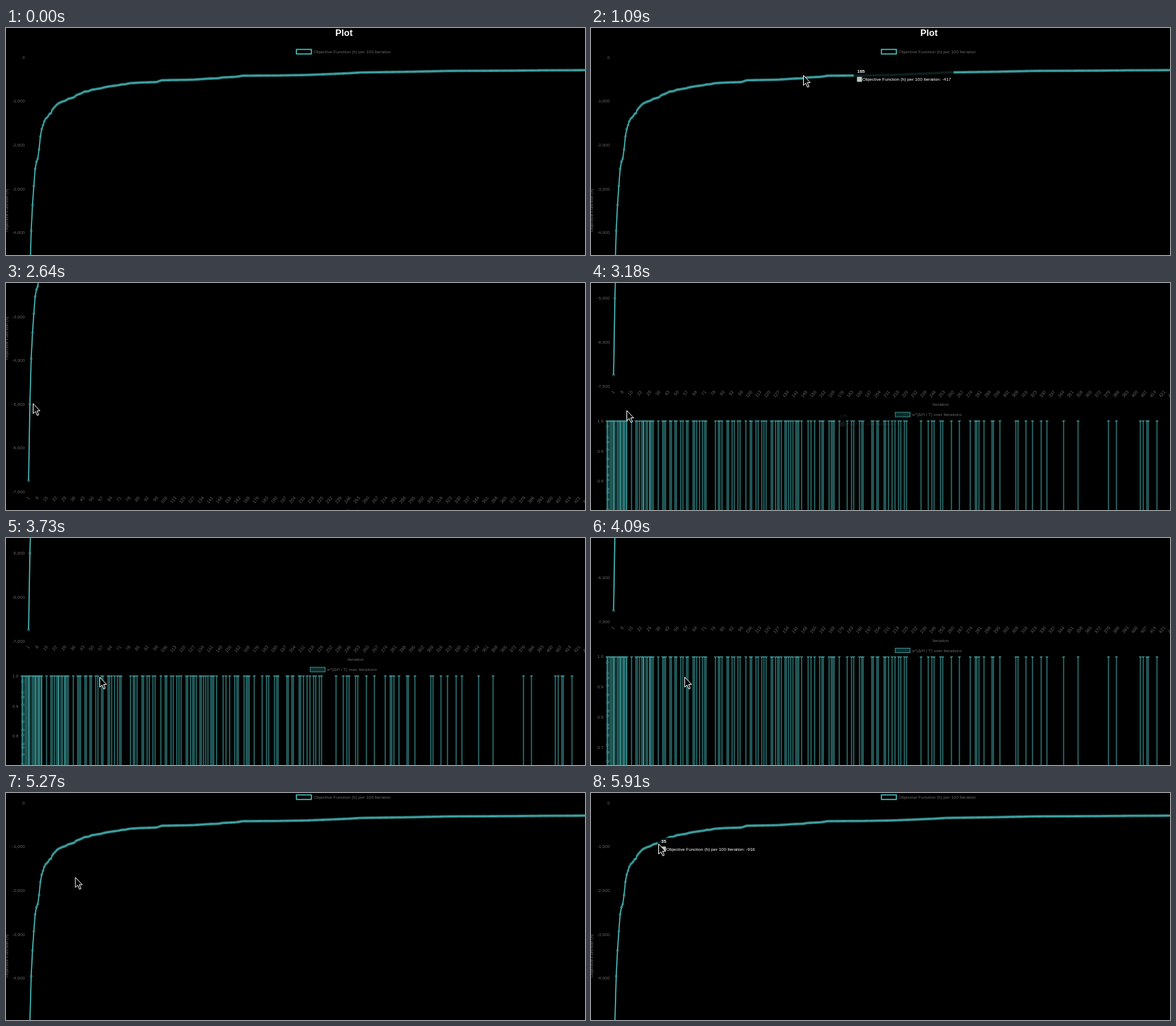
These frames come from a looping animation (800 by 314 pixels, 6 s). An HTML page:

```html
<!DOCTYPE html>
<html lang="en">
<head>
<meta charset="utf-8">
<title>Plot</title>
<style>
  html, body { margin: 0; width: 100%; height: 100%; overflow: hidden; background: #000; }
  svg { display: block; width: 100%; height: 100%; }
  text { font: 6.17px "Liberation Sans", Arial, sans-serif; fill: #666; }
  .title { font-size: 12.6px; font-weight: bold; fill: #fff; }
  .tip text { fill: #fff; }
  .tip .head { font-weight: bold; }
  .mid { text-anchor: middle; }
  .end { text-anchor: end; }
  .line { fill: none; stroke: #4bc0c0; stroke-width: 1.54; stroke-linejoin: round; }
  .dots { fill: rgba(0, 0, 0, .1); stroke: #45b0b0; stroke-width: .6; }
  .bars { fill: none; stroke: #3da3a2; stroke-width: 1.05; }
  .caps { fill: #2f7b7a; stroke: #459f9d; stroke-width: .5; }
</style>
</head>
<body>
<svg viewBox="0 0 800 314">
  <g id="page"></g>
  <g id="tip" class="tip">
    <rect y="-10.8" height="21.6" rx="3" fill="#000" fill-opacity=".8"/>
    <text class="head" x="5" y="-3.8"></text>
    <rect x="4.9" y="1.9" width="6.2" height="6.2" fill="#b4c8c5" stroke="#dfe8e6" stroke-width=".5"/>
    <text x="12" y="7.2"></text>
  </g>
  <path id="cursor" d="M.5 .5V14.3L3.7 11.4 6.1 16.9 8.2 16 5.9 10.6H10Z"
    fill="#000" stroke="#fff" stroke-width=".95" stroke-linejoin="round"/>
</svg>
<script>
const $ = id => document.getElementById(id);
const page = $('page'), tip = $('tip'), cursor = $('cursor');

function add(tag, attrs, content) {
  const el = document.createElementNS('http://www.w3.org/2000/svg', tag);
  for (const name in attrs) el.setAttribute(name, attrs[name]);
  if (content) el.textContent = content;
  page.append(el);
}
// y is the middle of the capitals
const label = (x, y, str, cls = '', turn = 0) =>
  add('text', { class: cls, y: 2.2, transform: `translate(${x} ${y}) rotate(${turn})` }, str);

// Values of the keys [step, a, b, ...] at step k, linear between keys
function track(keys, k) {
  const n = keys.findIndex(key => key[0] > k);
  if (n === 0) return keys[0].slice(1);
  if (n < 0) return keys[keys.length - 1].slice(1);
  const a = keys[n - 1], b = keys[n], f = (k - a[0]) / (b[0] - a[0]);
  return a.slice(1).map((v, i) => v + (b[i + 1] - v) * f);
}
const circle = (x, y, r) =>
  `M${(x + r).toFixed(2)} ${y.toFixed(2)}a${r} ${r} 0 1 1 ${-2 * r} 0a${r} ${r} 0 1 1 ${2 * r} 0z`;

const tickX = i => 31.2 + i * 1.812;
const series = 'Objective Function (h) per 100 Iteration';
const ratio = 'e^(ΔH / T) over Iterations';

function objectiveChart() {
  label(467, 6.6, 'Plot', 'title mid');
  page.lastChild.setAttribute('y', 4.4);
  add('rect', { x: 401.3, y: 29.6, width: 20.6, height: 6.3, fill: '#000', stroke: '#4bc0c0', 'stroke-width': 1.54 });
  label(425, 32.3, series);
  for (let i = 0; i < 8; i++)
    label(26, 40.6 + i * 60.6, i ? `-${i},000` : '0', 'end');
  label(1, 252.5, 'Objective Function (h)', 'mid', -90);

  const steep = [449.5, 343.7, 280.5, 244.6, 218.5, 195, 185, 180.8, 168, 150, 140, 134.5, 129, 125.5, 124]
    .map((y, i) => [tickX(i), y]);
  const flat = [
    [58, 122.5], [60, 119], [62, 118], [64, 113], [66, 110.5], [68, 108.5], [70, 106], [72, 104.5],
    [76, 102.5], [82, 100.5], [86, 98], [94, 96], [97, 93], [105, 90], [108, 88], [114, 87.5],
    [118, 85.5], [131, 83.5], [137, 81.8], [145, 80.5], [156, 79], [160, 78], [165, 77.8], [170, 76.5],
    [185, 75.5], [208, 74.8], [215, 72.3], [258, 71.5], [280, 70], [294, 69.5], [298, 68.5], [318, 67.5],
    [327, 66], [375, 65.7], [415, 65], [445, 63.8], [475, 62.5], [490, 61.5], [520, 61.1], [560, 60.5],
    [610, 59.4], [700, 59], [740, 58.6], [806, 58.3]
  ];
  const curve = steep.concat(flat);
  const points = Array.from({ length: 427 }, (_, i) => [tickX(i), track(curve, tickX(i))[0]]);
  add('polyline', { class: 'line', points: points.map(p => p.map(v => v.toFixed(2))).join(' ') });
  add('path', { class: 'dots', d: points.map(p => circle(...p, 1.54)).join('') });

  for (let i = 0; i < 434; i += 7) label(tickX(i), 472, i + 1, 'end', -50);
  label(483, 490.5, 'Iteration', 'mid');
}

function ratioChart() {
  const top = 513;
  add('rect', { x: 420.3, y: 501.4, width: 20.6, height: 6.2, fill: '#0f2c2c', stroke: '#3d9c9c', 'stroke-width': .9 });
  label(444, 504.5, ratio);
  for (let i = 0; i < 4; i++) label(17.2, top + i * 41.8, (1 - i / 10).toFixed(1), 'end');

  const xs = [
    22, 23.5, 26, 28, 30, 31.5, 33, 36, 38, 40, 41, 43, 45, 46, 48, 49.5, 56, 62, 64, 67, 70, 72, 73, 76, 78,
    81, 82, 84, 86, 93, 99, 101, 103, 109, 111, 116, 118, 124, 127, 132, 134, 141, 143, 146, 150, 154, 157, 159,
    172, 176, 178, 181, 188, 190, 195, 198, 203, 206, 214, 220, 222, 228, 231, 236, 239, 242, 249, 251, 255,
    258, 260, 263, 268, 270, 273, 276, 279, 283, 285, 287, 291, 300, 304, 309, 316, 319, 321, 329, 332, 334,
    336, 343, 354, 360, 363, 371, 374, 376, 388, 390, 395, 397, 405, 407, 411, 416, 420, 425, 428, 433, 436,
    456, 466, 471, 474, 483, 486, 498, 509, 524, 531, 533, 536, 543, 554, 556, 565, 587, 590, 601, 610, 622,
    630, 653, 673, 715, 726, 759, 763, 768, 770, 782
  ];
  add('path', { class: 'bars', d: xs.map(x => `M${x} ${top}V670`).join('') });
  add('path', { class: 'caps', d: xs.map(x => `M${x - 1.8} ${top}h3.6l-1.2 1.5h-1.2z`).join('') });

  let seed = 7;
  const rand = () => (seed = seed * 16807 % 2147483647) / 2147483647;
  let dots = '';
  for (let y = top + 8; y < 665; y += 4 + rand() * 12) dots += circle(22.6 + rand(), y, 1.5);
  add('path', { class: 'dots', d: dots });
}

// Keys count in steps of 1/11 s
const scroll = [
  [23, 0], [24, 18], [25, 54], [27, 108], [29, 176], [31, 250], [32, 269], [33, 269], [34, 302], [35, 322.5],
  [42, 322.5], [43, 332], [44, 344], [45, 349], [47, 349], [48, 330], [49, 278], [50, 212], [51, 148],
  [52, 90.5], [53, 90.5], [54, 80], [55, 74], [56, 52], [57, 35], [58, 27]
];
const pointer = [
  [1, 396, 204], [4, 395, 120], [6, 394, 66], [8, 392, 65], [12, 293, 65], [14, 291, 66], [15, 275, 72],
  [21, 17, 148], [22, 18, 150], [23, 23, 155], [32, 44, 172], [33, 44, 172], [35, 49, 176], [38, 130, 193],
  [40, 130, 193], [41, 129, 192], [53, 129, 192], [60, 82, 86], [61, 81, 84], [65, 93, 70]
];
// left, middle, opacity
const tipMove = [
  [4, 398, 66, 0], [7, 398, 66, 1], [9, 398, 66, 1], [12, 363, 66, 1], [14, 335, 66, 1], [16, 331, 66, 0],
  [33, 339, 190, 0], [34, 339, 190, .06], [35, 339, 190, .1], [37, 339, 190, 0],
  [61, 90, 73, 0], [64, 92, 72.5, 1]
];
const tipText = [
  [0, 203, series + ': -404', 138], [9, 165, series + ': -417', 138],
  [30, 175, ratio + ': 1', 92], [50, 35, series + ': -916', 138]
];

const [tipBox, tipHead, , tipBody] = tip.children;
const move = (el, x, y) => el.setAttribute('transform', `translate(${x.toFixed(1)} ${y.toFixed(1)})`);

let shown = -1;
function draw(now) {
  const k = Math.floor((now % 6000 + 5) * 11 / 1000) % 66;
  if (k !== shown) {
    shown = k;
    move(page, 0, -track(scroll, k)[0]);
    move(cursor, ...track(pointer, k));
    cursor.style.display = k ? '' : 'none';
    const [x, y, alpha] = track(tipMove, k);
    const [, head, body, width] = tipText.filter(t => t[0] <= k).pop();
    move(tip, x, y);
    tip.style.opacity = alpha;
    tipBox.setAttribute('width', width);
    tipHead.textContent = head;
    tipBody.textContent = body;
  }
}

objectiveChart();
ratioChart();
const start = performance.now();
draw(0);
requestAnimationFrame(function loop() {
  draw(performance.now() - start);
  requestAnimationFrame(loop);
});
</script>
</body>
</html>
```
